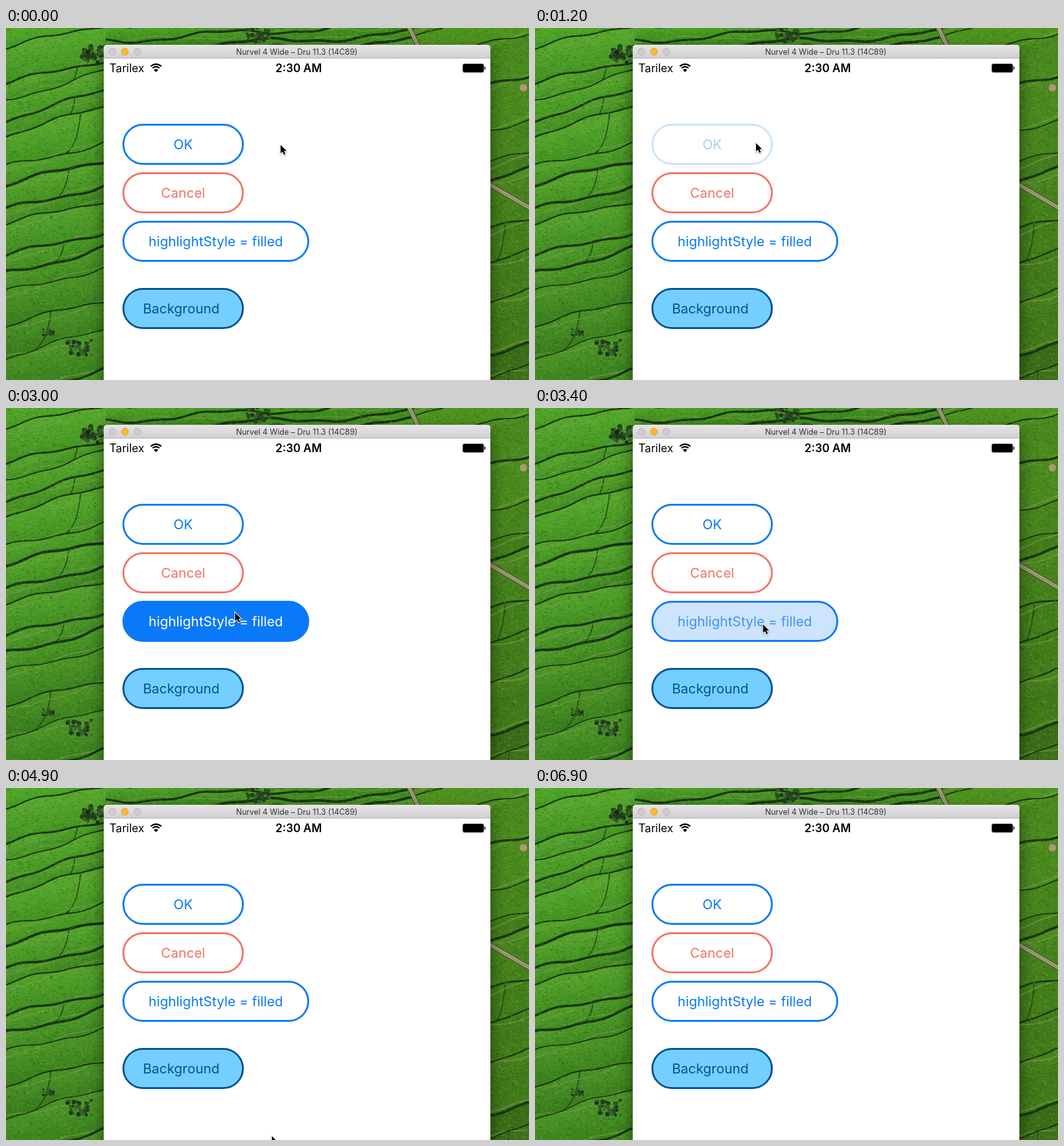
An HTML page with a canvas for the animation above (7 s loop, 840 px wide and 566 px high).

```html
<!DOCTYPE html>
<html lang="en">
<head>
<meta charset="utf-8">
<title>Button highlight styles</title>
<style>
  html, body { margin: 0; width: 100%; height: 100%; overflow: hidden; }
  canvas { display: block; }
</style>
</head>
<body>
<canvas id="stage" width="840" height="566"></canvas>
<script>
const LOOP = 7000, STEP = 100, W = 840, H = 566;
const ctx = document.getElementById('stage').getContext('2d');
const scenery = document.createElement('canvas');
scenery.width = W;
scenery.height = H;

const BLUE = '#0a79f8', RED = '#f37366', NAVY = '#005296', SKY = '#74cfff';

// mid: centre of the label; tip: where the pointer presses, from down to up
const buttons = [
  { label: 'OK', y: 154, w: 195, mid: 284.5, color: BLUE, faded: '#a5cff1', edge: '#cbe3f7',
    tip: { x: 355, y: 185 }, down: 1000, up: 1300 },
  { label: 'Cancel', y: 232, w: 195, mid: 284.5, color: RED, faded: '#f2d0ca', edge: '#f4e5e0',
    tip: { x: 348, y: 265 }, down: 2000, up: 2400 },
  { label: 'highlightStyle = filled', y: 310, w: 300, mid: 337, color: BLUE, filled: true,
    tip: { x: 368, y: 329 }, down: 2800, up: 3200 },
  { label: 'Background', y: 418, w: 195, mid: 281.5, color: NAVY, faded: '#51a8e2', edge: '#5ab2eb', fill: SKY,
    tip: { x: 357, y: 451 }, down: 3800, up: 4200 }
];

// the pointer rests at each stop and glides between stops
const stops = [
  { x: 441, y: 188, from: 0, to: 300 },
  ...buttons.map(b => ({ ...b.tip, from: b.down - 100, to: b.up + 100 })),
  { x: 440, y: 580, from: 5100, to: LOOP }
];

const clamp = v => Math.max(0, Math.min(1, v));
const ease = v => v * v * (3 - 2 * v);
const lerp = (a, b, k) => a + (b - a) * k;

function mix(a, b, k) {
  const part = (c, i) => parseInt(c.slice(i, i + 2), 16);
  return `rgb(${[1, 3, 5].map(i => Math.round(lerp(part(a, i), part(b, i), k)))})`;
}

function seeded(seed) {
  return () => (seed = seed * 16807 % 2147483647) / 2147483647;
}

function text(g, str, x, y, font, color, align = 'center') {
  g.font = font + ' Inter, sans-serif';
  g.fillStyle = color;
  g.textAlign = align;
  g.fillText(str, x, y);
}

function disc(g, x, y, r, fill, line) {
  g.beginPath();
  g.arc(x, y, r, 0, Math.PI * 2);
  g.fillStyle = fill;
  g.fill();
  if (line) {
    g.strokeStyle = line;
    g.lineWidth = 1;
    g.stroke();
  }
}

// Stacked fields with wavy hedges, filling one column of the landscape
function drawTerraces(g, { x, w, hue, slope, gap, seed }) {
  const rnd = seeded(seed);
  const hedge = (y, px) => y + slope * (px - x) + 5 * Math.sin(px / 38 + y) + 1.5 * Math.sin(px / 12 + y * 2);
  const trace = y => {
    g.beginPath();
    for (let px = x - 8; px <= x + w + 8; px += 4) g.lineTo(px, hedge(y, px));
  };
  g.save();
  g.beginPath();
  g.rect(x, 0, w, H);
  g.clip();
  for (let y = -40; y < H - slope * w + gap;) {
    const next = y + gap * (.45 + rnd() * 1.1);
    const light = 38 - 7 * clamp(y / H) + rnd() * 3;
    const shade = g.createLinearGradient(0, y, -slope * 40, next + 12);
    shade.addColorStop(0, `hsl(${hue} 58% ${light + 3}%)`);
    shade.addColorStop(1, `hsl(${hue + 4} 64% ${light - 5}%)`);
    trace(y);
    g.lineTo(x + w + 8, H * 2);
    g.lineTo(x - 8, H * 2);
    g.fillStyle = shade;
    g.fill();

    // a narrow hedge across the field
    if (rnd() < .45) {
      const px = x + rnd() * w;
      g.beginPath();
      g.moveTo(px, hedge(y, px));
      g.quadraticCurveTo(px - 6, (y + next) / 2, px - 28, hedge(next, px - 28));
      g.strokeStyle = '#23451a';
      g.lineWidth = 1.6;
      g.stroke();
    }
    trace(y + 3);
    g.strokeStyle = `hsl(${hue - 10} 42% 43% / .7)`;
    g.lineWidth = 2;
    g.stroke();
    trace(y);
    g.strokeStyle = '#1a3512';
    g.lineWidth = 1.6 + rnd() * 2.8;
    g.stroke();
    y = next;
  }
  for (let i = 0; i < w * 45; i++) {
    g.fillStyle = rnd() < .5 ? 'rgba(20,60,5,.2)' : 'rgba(150,205,80,.17)';
    g.fillRect(x + rnd() * w, rnd() * H, 1 + rnd() * 3, 1 + rnd());
  }
  g.restore();
}

function drawTrees(g, x, y, r, seed) {
  const rnd = seeded(seed);
  for (let i = 0; i < 45; i++) {
    disc(g, x + (rnd() - .5) * r * 2, y + (rnd() - .5) * r * 1.3, r * (.06 + rnd() * .15),
      `hsl(108 38% ${12 + rnd() * 18}%)`);
  }
}

function drawTrack(g, x0, y0, x1, y1) {
  for (const [color, width] of [['#56642f', 9], ['#a9a78c', 5], ['#7c8a52', 1.4]]) {
    g.beginPath();
    g.moveTo(x0, y0);
    g.lineTo(x1, y1);
    g.strokeStyle = color;
    g.lineWidth = width;
    g.stroke();
  }
}

function drawLandscape(g) {
  drawTerraces(g, { x: 0, w: 160, hue: 100, slope: -.27, gap: 41, seed: 41 });
  drawTerraces(g, { x: 160, w: 500, hue: 98, slope: -.06, gap: 24, seed: 7 });
  drawTerraces(g, { x: 655, w: 185, hue: 92, slope: -.3, gap: 52, seed: 23 });
  drawTrack(g, 647, -2, 662, 29);
  drawTrack(g, 774, 250, 844, 291);
  drawTrees(g, 405, 11, 18, 3);
  drawTrees(g, 142, 42, 20, 5);
  drawTrees(g, 118, 514, 19, 9);
  drawTrees(g, 68, 490, 9, 11);
  disc(g, 831, 96, 6, '#b09573');
}

function drawWifi(g, x, y) {
  const sweep = [-Math.PI * .75, -Math.PI * .25];
  g.strokeStyle = g.fillStyle = '#000';
  g.lineWidth = 2.4;
  for (const r of [11.8, 7.8]) {
    g.beginPath();
    g.arc(x, y, r, ...sweep);
    g.stroke();
  }
  g.beginPath();
  g.moveTo(x, y + 1);
  g.arc(x, y + 1, 5, ...sweep);
  g.fill();
}

function drawBattery(g, x, y) {
  g.beginPath();
  g.roundRect(x + .5, y + .5, 34, 14, 2.5);
  g.strokeStyle = '#858585';
  g.lineWidth = 1;
  g.stroke();
  g.fillStyle = '#000';
  g.beginPath();
  g.roundRect(x + 1, y + 1, 33, 13, 2);
  g.roundRect(x + 35.5, y + 5, 1.5, 5, .7);
  g.fill();
}

function drawWindow(g) {
  g.save();
  g.shadowColor = 'rgba(0,0,0,.5)';
  g.shadowBlur = 26;
  g.shadowOffsetY = 9;
  g.beginPath();
  g.roundRect(157, 27, 621, 580, 5);
  g.fillStyle = '#fff';
  g.fill();
  g.restore();

  const bar = g.createLinearGradient(0, 27, 0, 49);
  bar.addColorStop(0, '#e8e5e8');
  bar.addColorStop(1, '#d1ced1');
  g.beginPath();
  g.roundRect(157, 27, 621, 22, [5, 5, 0, 0]);
  g.fillStyle = bar;
  g.fill();
  g.fillStyle = '#b2afb2';
  g.fillRect(157, 48, 621, 1);

  for (let i = 0; i < 3; i++) {
    const [fill, line] = i === 1 ? ['#fdb927', '#e1a12b'] : ['#d0ccd0', '#b9b5b9'];
    disc(g, 171 + i * 20, 38, 5.5, fill, line);
  }
  text(g, 'Nurvel 4 Wide – Dru 11.3 (14C89)', 467, 43, '12.6px', '#333');

  text(g, 'Tarilex', 166, 71, '18px', '#000', 'left');
  text(g, '2:30 AM', 470, 71, '600 18px', '#000');
  drawWifi(g, 241, 70);
  drawBattery(g, 733, 57);
}

function drawButton(b, t) {
  const k = t < b.up ? clamp((t - b.down) / 100) : 1 - clamp((t - b.up) / 250);
  ctx.beginPath();
  ctx.roundRect(188.5, b.y + 1.5, b.w - 3, 63, 31.5);
  ctx.fillStyle = b.filled ? mix('#ffffff', b.color, k) : b.fill || '#fff';
  ctx.fill();
  ctx.strokeStyle = b.filled ? b.color : mix(b.color, b.edge, k);
  ctx.lineWidth = 3;
  ctx.stroke();
  text(ctx, b.label, b.mid, b.y + 41, '21.7px', mix(b.color, b.filled ? '#ffffff' : b.faded, k));
}

function drawPointer(t) {
  const next = stops.findIndex(s => s.to > t);
  const a = stops[Math.max(0, next - 1)], b = stops[next];
  const k = next ? ease(clamp((t - a.to) / (b.from - a.to))) : 1;
  ctx.save();
  ctx.translate(lerp(a.x, b.x, k), lerp(a.y, b.y, k));
  ctx.shadowColor = 'rgba(0,0,0,.35)';
  ctx.shadowBlur = 3;
  ctx.shadowOffsetY = 1;
  const arrow = new Path2D('M0 0V13.5L3.1 10.7L5.4 15.8L7.8 14.7L5.6 9.8H9.6Z');
  ctx.strokeStyle = '#fff';
  ctx.lineWidth = 2;
  ctx.stroke(arrow);
  ctx.shadowColor = 'transparent';
  ctx.fillStyle = '#000';
  ctx.fill(arrow);
  ctx.restore();
}

function frame(now) {
  const t = Math.floor((now % LOOP) / STEP) * STEP;
  ctx.drawImage(scenery, 0, 0);
  for (const b of buttons) drawButton(b, t);
  drawPointer(t);
  requestAnimationFrame(frame);
}

const backdrop = scenery.getContext('2d');
drawLandscape(backdrop);
drawWindow(backdrop);
requestAnimationFrame(frame);
</script>
</body>
</html>
```
